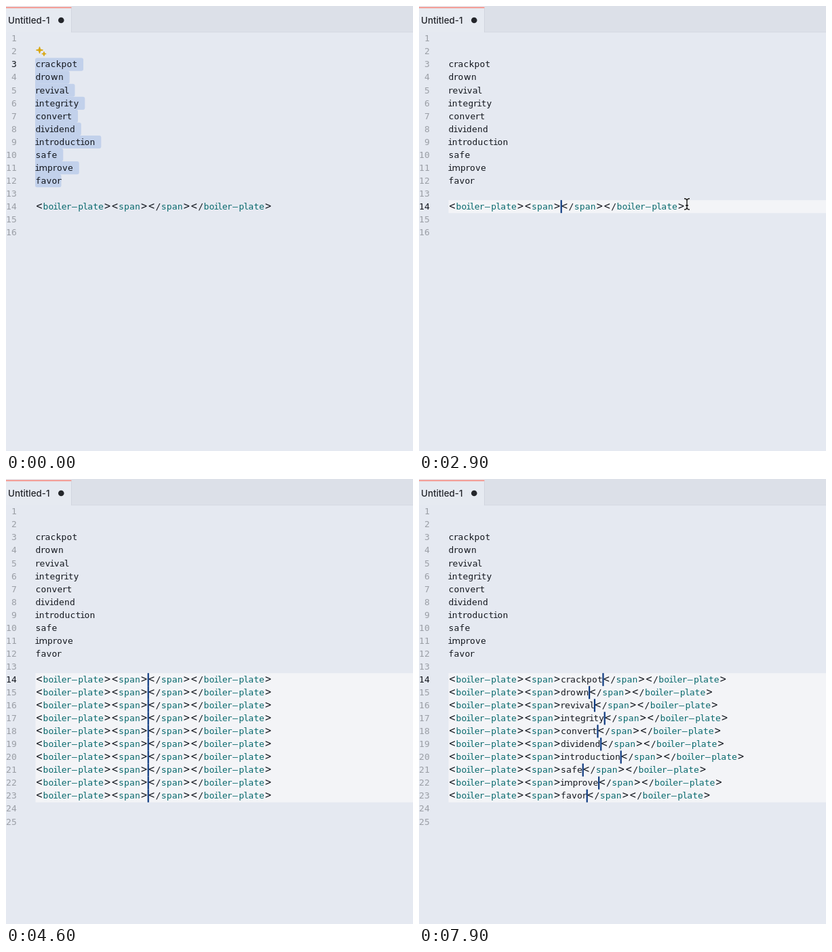
An HTML page that plays this animation: 600x656 px, repeating every 8 s.

```html
<!DOCTYPE html>
<html lang="en">
<head>
<meta charset="utf-8">
<title>Editor</title>
<style>
html, body { margin: 0; width: 100%; height: 100%; overflow: hidden; background: #e5e9f1; }
svg { display: block; width: 100%; height: 100%; }
text { white-space: pre; }
.code { font: 13px "DejaVu Sans Mono", monospace; text-anchor: middle; fill: #14181f; }
.wide { font-family: "DejaVu Sans", sans-serif; }
.mark { font-size: 15px; }
.tag { fill: #08696d; }
.num { fill: #9b9fa6; }
.now { fill: #14181f; }
.ui { font: 500 13.35px Inter, "Open Sans", sans-serif; fill: #23252b; }
.tip { font: 500 12.5px Inter, "Open Sans", sans-serif; fill: #3b3e47; }
.key { font: 10.5px Inter, "DejaVu Sans", sans-serif; fill: #3a3c42; text-anchor: middle; }
.palette { filter: drop-shadow(0 1px 5px rgba(20, 25, 40, .32)); }
.hint { filter: drop-shadow(0 1px 2px rgba(20, 25, 40, .08)); }
</style>
</head>
<body>
<svg id="stage" viewBox="0 0 600 656" preserveAspectRatio="none"></svg>
<script>
const LOOP = 8000, STEP = 100;
const LEFT = 43.5, PITCH = 19.05;
const T = { tip: 1500, press: 1600, click: 1800, open: 3500, spread: 4600, paste: 5600 };
const WORDS = ['crackpot', 'drown', 'revival', 'integrity', 'convert', 'dividend',
  'introduction', 'safe', 'improve', 'favor'];
const COMMANDS = ['Spread selection by lines in clipboard', 'Replace With Current Cursor Index',
  'File: Open Folder...', 'Repeat Paste', 'Developer: Reload Window',
  "Shell Command: Install 'code' command in PATH", 'Help: About',
  'Preferences: Open Keyboard Shortcuts (JSON)', 'Preferences: Open User Settings (JSON)',
  'Preferences: Open User Settings', 'Switch Font', 'Delete Line', 'Hide Custom Title Bar'];
const HEAD = '<boiler–plate><span>', TAIL = '</span></boiler–plate>';

// Advances of the duospaced code face; other letters take 8.
const ADVANCE = { i: 5.25, l: 6, r: 6, t: 7.75, m: 12.2, w: 11.4, '<': 11, '>': 11, '/': 8.75, '–': 10.5 };
const advance = c => ADVANCE[c] || 8;
const measure = s => [...s].reduce((sum, c) => sum + advance(c), 0);

const midY = n => 48 + PITCH * (n - 1);
const esc = c => c === '<' ? '&lt;' : c === '>' ? '&gt;' : c;
const rect = (x, y, w, h, fill, extra = '') =>
  `<rect x="${x}" y="${y}" width="${w}" height="${h}" fill="${fill}" ${extra}/>`;
const label = (s, x, y, cls = 'ui', extra = '') =>
  `<text class="${cls}" x="${x}" y="${y}" ${extra}>${s}</text>`;

function code(s, n, x = LEFT, cls = '') {
  let inTag = false, spans = '';
  for (const c of s) {
    if (c === '<') inTag = true;
    if (c === '>') inTag = false;
    const kind = /[<>]/.test(c) ? 'mark' : inTag && c !== '/' ? 'tag' : /[mw]/.test(c) ? 'wide' : '';
    spans += `<tspan x="${(x + advance(c) / 2).toFixed(2)}" class="${kind}">${esc(c)}</tspan>`;
    x += advance(c);
  }
  return `<text class="code ${cls}" y="${(midY(n) + 4.3).toFixed(2)}">${spans}</text>`;
}

const caret = (x, n) => rect(x - .4, midY(n) - 9.5, 2.2, PITCH, '#0d3a80');

function star(x, y, r) {
  const k = r * .22;
  return `<path fill="#d9a60d" d="M${x} ${y - r}L${x + k} ${y - k}L${x + r} ${y}L${x + k} ${y + k}` +
    `L${x} ${y + r}L${x - k} ${y + k}L${x - r} ${y}L${x - k} ${y - k}Z" stroke="#d9a60d" stroke-linejoin="round"/>`;
}

const gear = (x, y) => `<g transform="translate(${x} ${y})" fill="none" stroke="#35373d">
  <circle r="6.4" stroke-width="2" stroke-dasharray="2.513"/>
  <circle r="5.1" stroke-width="1.1"/><circle r="2" stroke-width="1.1"/></g>`;

const keycap = (s, x, y) =>
  rect(x - 11.5, y - 8.5, 23, 17.5, '#e9e8ed', 'rx="3" stroke="#c6c5cc"') + label(s, x, y + 4, 'key');

function tabs() {
  return rect(0, 0, 600, 39, '#dce0e8') + rect(0, 38, 600, 1, '#d6dae3') +
    rect(0, 0, 96.5, 39.5, '#e6eaf1') + rect(0, 1.5, 96.5, 1.7, '#f78a80') +
    rect(96, 3, 1, 36, '#d2d6df') + label('Untitled-1', 3, 25.8) +
    '<circle cx="81.3" cy="21" r="4.3" fill="#24262b"/>';
}

function selection() {
  return WORDS.map((w, i) => {
    const end = i < WORDS.length - 1 ? 9.3 : .5;
    return rect(LEFT - .5, midY(i + 3) - 9.5, measure(w) + end, PITCH + .1, '#c2d1eb', 'rx="3"');
  }).join('') + rect(LEFT - .5, midY(3) - 6, 6, PITCH * 9 + 12, '#c2d1eb');
}

function tooltip() {
  return '<g class="hint">' + rect(152.5, 209.5, 470, 76.5, '#f3f4f7', 'rx="3" stroke="#b9bdc6"') + '</g>' +
    label("The span element doesn't mean anything on its own, but can be useful when used", 162, 228.5, 'tip') +
    label('together with the global attributes, e.g. class, lang, or dir. It represents its', 162, 247.4, 'tip') +
    label('ZWQ Reference', 162, 274.6, 'tip', 'style="fill:#0c3470"');
}

function palette(t) {
  const y = i => 53.5 + 23.27 * i;
  const blink = (t - T.open) % 1000 < 500;
  return '<g class="palette">' + rect(67, 3, 482.5, 329, '#f8f6f9', 'rx="6"') + '</g>' +
    rect(72, 42, 473, 23, '#dadae0', 'rx="3"') + rect(72, y(10) - 11.7, 473, 23.3, '#e4eaf0', 'rx="3"') +
    rect(538.5, 42, 6.5, 21, '#c9c9cf') +
    rect(73.5, 11, 463.5, 26, '#faf8fb', 'rx="2.5" stroke="#2583d8" stroke-width="1.3"') +
    label('&gt;', 80, 28.8) + (blink ? rect(91, 16, 1.2, 16, '#222') : '') +
    '<clipPath id="list"><rect x="67" y="40" width="482" height="292" rx="5"/></clipPath><g clip-path="url(#list)">' +
    COMMANDS.map((s, i) => label(s, 83.5, y(i) + 4.8)).join('') + '</g>' +
    label('recently used', 504, y(0) + 4.8, 'ui', 'text-anchor="end"') +
    gear(519, y(0)) + gear(519, y(10)) +
    keycap('⌘', 488.5, y(4)) + keycap('R', 515, y(4)) +
    keycap('⇧', 460.5, y(11)) + keycap('⌘', 488.5, y(11)) + keycap('K', 515, y(11));
}

// Pointer stops: time, x, y.
const PATH = [[200, 511, 670], [900, 250, 317], [1200, 209, 296], [2000, 209, 296], [2600, 395, 292]];

function pointer(t) {
  let i = 0;
  while (i < PATH.length - 2 && t > PATH[i + 1][0]) i++;
  const [a, b] = [PATH[i], PATH[i + 1]];
  const p = Math.min(1, Math.max(0, (t - a[0]) / (b[0] - a[0])));
  const k = i === 0 ? 1 - (1 - p) ** 2 : p * p * (3 - 2 * p);
  const x = a[1] + (b[1] - a[1]) * k, y = a[2] + (b[2] - a[2]) * k;
  const beam = 'M-4-8Q0-8 0-5Q0-8 4-8M0-5V5M-4 8Q0 8 0 5Q0 8 4 8M-2 2H2';
  const ring = t >= T.press && t < T.click
    ? '<circle r="17.3" fill="#fff" fill-opacity=".25" stroke="#111" stroke-width="1.6"/>' : '';
  return `<g transform="translate(${x} ${y})" fill="none">${ring}
    <path d="${beam}" stroke="#fff" stroke-opacity=".7" stroke-width="3"/>
    <path d="${beam}" stroke="#111" stroke-width="1.4"/></g>`;
}

function scene(t) {
  const clicked = t >= T.click, spread = t >= T.spread, pasted = t >= T.paste;
  const rows = spread ? WORDS.length : 1;
  const fills = WORDS.slice(0, rows).map(w => pasted ? w : '');
  const active = clicked ? 14 : 3;
  let out = rect(0, 0, 600, 656, '#e5e9f1') + tabs();

  if (clicked) out += rect(LEFT, midY(14) - 9.5, 557, PITCH * rows, '#f3f4f7');
  else out += selection();
  if (t < T.click + STEP) {
    out += `<g opacity="${clicked ? .5 : 1}">${star(49.5, 65, 5)}${star(56, 70.5, 3.2)}</g>`;
  }
  if (t >= T.tip && !clicked) {
    out += rect(LEFT + measure('<boiler–plate><'), midY(14) - 9, 33, 18, '#d9e3ea');
  }

  for (let n = 1; n <= 15 + rows; n++) {
    const s = String(n);
    out += code(s, n, 16 - 8 * s.length, n === active ? 'now' : 'num');
  }
  WORDS.forEach((w, i) => out += code(w, i + 3));
  fills.forEach((w, i) => out += code(HEAD + w + TAIL, 14 + i));

  const since = pasted ? T.paste : spread ? T.spread : clicked ? T.click : 300;
  if (t >= since && (t - since) % 1000 < 500) {
    if (clicked) fills.forEach((w, i) => out += caret(LEFT + measure(HEAD + w), 14 + i));
    else out += caret(LEFT, 3);
  }

  if (t >= T.tip && !clicked) out += tooltip();
  if (t >= 200 && t < T.open) out += pointer(t);
  if (t >= T.open && !spread) out += palette(t);
  return out;
}

const stage = document.getElementById('stage');
let shown = -1;
function tick() {
  const t = Math.floor((performance.now() + 15) / STEP) * STEP % LOOP;
  if (t !== shown) stage.innerHTML = scene(shown = t);
  requestAnimationFrame(tick);
}
tick();
</script>
</body>
</html>
```
